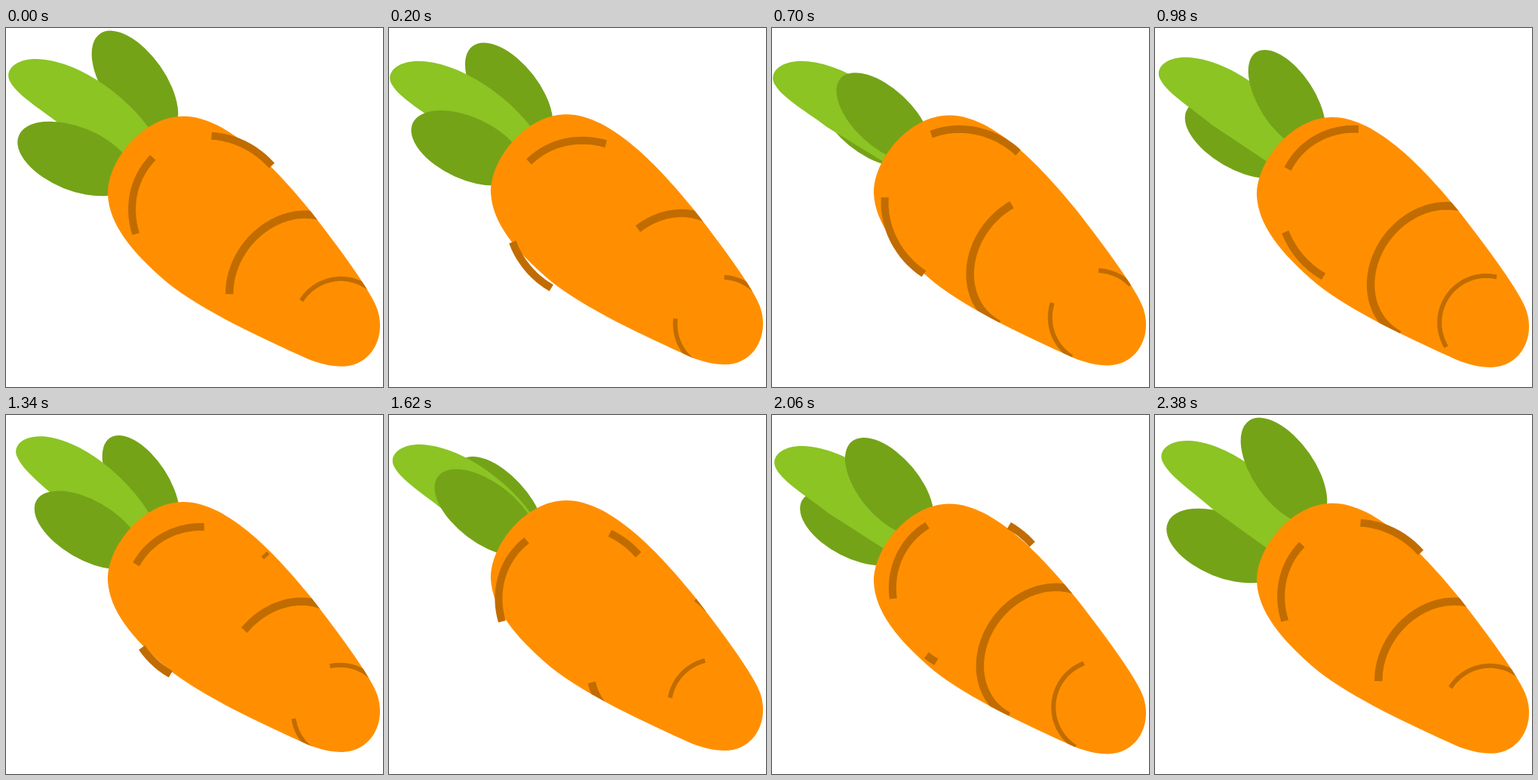
Animation, 500 px wide and 475 px high, one loop 2400 ms. Source, as an HTML page:

```html
<!DOCTYPE html>
<html lang="en">
<head>
<meta charset="utf-8">
<title>Spinning carrot</title>
<style>
  html, body { margin: 0; width: 100%; height: 100%; overflow: hidden; background: #fff; }
  svg { display: block; width: 500px; height: 475px; }
  .dark { fill: #74a318; }
  .mark { fill: none; stroke: #c16c00; stroke-linejoin: round; }
</style>
</head>
<body>
<svg viewBox="0 0 500 475" xmlns="http://www.w3.org/2000/svg">
  <defs>
    <clipPath id="clip"><use id="clipBody" href="#body"/></clipPath>
    <path id="body" d="M135 222C133 180 180 118 235 118C295 118 360 190 405 245C440 290 485 350 493 375C505 415 480 449 446 449C430 449 415 445 400 439C340 412 260 375 215 339C165 297 137 260 135 222Z"/>
  </defs>
  <ellipse id="back" class="dark"/>
  <path id="light" fill="#8bc423" d="M190 133C160 90 95 42 40 41C10 41 -3 58 6 72C16 90 50 110 75 130L150 178L200 190Z"/>
  <ellipse id="front" class="dark"/>
  <use id="flesh" href="#body" fill="#ff8f00"/>
  <g id="crown" class="mark" stroke-width="10"></g>
  <g clip-path="url(#clip)">
    <g id="waist" class="mark" stroke-width="10.5"></g>
    <g id="tip" class="mark" stroke-width="6"></g>
  </g>
</svg>
<script>
const LOOP = 2400, STEP = 20, TURN = 1190;
const $ = id => document.getElementById(id);

// Leaf knots: time, centre x, centre y, angle, half length, half width
const leafA = [
  [0, 92, 173, 22, 81, 42], [420, 119, 142.5, 29, 78, 40],
  [980, 175, 95, 57, 75, 37], [1190, 181, 88, 60, 75, 37],
  [1340, 179, 93, 57, 75, 37], [1620, 147, 115, 47, 75, 36],
  [2060, 109, 149, 27, 78, 40], [2380, 92, 173, 22, 81, 42]
];
const leafB = [
  [0, 171, 74, 55, 81, 41], [420, 146, 102, 48, 78, 40],
  [980, 110, 147, 30, 78, 39], [1190, 105, 155, 28, 78, 39],
  [1340, 108, 152, 30, 78, 39], [1620, 128, 129, 37, 79, 40],
  [2060, 155.7, 95, 50, 78, 40], [2380, 171, 74, 55, 81, 41]
];
// Tilt of the light leaf: time, degrees
const sway = [
  [0, 0], [200, -1.2], [420, 0.7], [700, -1.2], [980, 1], [1130, -0.8],
  [1340, 5.5], [1620, 0.9], [1840, -1.2], [2060, 0], [2200, -1], [2380, 3]
];

// Rings of marks: centre, radii, visible limit, arcs in degrees
const rings = {
  crown: { u: -103, du: 10, v: -2, dv: 1, r: 102, b: 110, max: 100,
           arcs: [[-55, 5], [52, 115], [-184, -118]] },
  waist: { u: 25, du: 22, v: 0, dv: 0.4, r: 95, b: 80, max: 100,
           arcs: [[-45, 173]] },
  tip:   { u: 122, du: 9, v: -5, dv: 0, r: 62, b: 62, max: 97,
           arcs: [[-7, 127], [-159, -93]] }
};

const wave = (t, peak) => Math.cos(2 * Math.PI * (t - peak) / TURN);

// Smooth curve through uneven knots
function spline(knots, t) {
  const last = knots.length - 1;
  let i = 0;
  while (i < last - 1 && t >= knots[i + 1][0]) i++;
  const p = knots[i], q = knots[i + 1];
  const h = q[0] - p[0], s = Math.min(1, (t - p[0]) / h);
  const slope = (k, c) => {
    const a = knots[Math.max(0, k - 1)], b = knots[Math.min(last, k + 1)];
    return (b[c] - a[c]) / (b[0] - a[0]);
  };
  return p.slice(1).map((y0, n) => {
    const c = n + 1, d = q[c] - y0;
    const m0 = slope(i, c) * h, m1 = slope(i + 1, c) * h;
    return y0 + s * (m0 + s * (3 * d - 2 * m0 - m1 + s * (m0 + m1 - 2 * d)));
  });
}

function setLeaf(el, [x, y, angle, a, b]) {
  el.setAttribute("rx", a);
  el.setAttribute("ry", b);
  el.setAttribute("transform", `translate(${x} ${y}) rotate(${angle})`);
}

// Carrot coordinates (u along the axis, v across it) to the stage
const place = (u, v) =>
  (346 + 0.774 * u + 0.634 * v).toFixed(2) + " " + (307 + 0.634 * u - 0.774 * v).toFixed(2);

function arcPath(ring, from, to, t) {
  const cu = ring.u + ring.du * wave(t, 30);
  const cv = ring.v + ring.dv * (-3 + 11 * wave(t, 985));
  const n = Math.max(2, Math.ceil((to - from) / 4));
  const pts = [];
  for (let i = 0; i <= n; i++) {
    const a = (from + (to - from) * i / n) * Math.PI / 180;
    pts.push(place(cu - ring.b * Math.cos(a), cv + ring.r * Math.sin(a)));
  }
  return "M" + pts.join("L");
}

function ringPath(ring, t) {
  const spin = 360 * (t % TURN) / TURN;
  let d = "";
  for (const [start, end] of ring.arcs) {
    for (const turn of [-360, 0, 360]) {
      const from = Math.max(-ring.max, start + spin + turn);
      const to = Math.min(ring.max, end + spin + turn);
      if (to > from) d += arcPath(ring, from, to, t);
    }
  }
  return d;
}

const paths = {};
for (const id in rings) {
  paths[id] = document.createElementNS("http://www.w3.org/2000/svg", "path");
  $(id).append(paths[id]);
}

function draw(time) {
  const t = Math.floor((time % LOOP) / STEP) * STEP;
  const aFront = t < TURN;
  setLeaf($(aFront ? "front" : "back"), spline(leafA, t));
  setLeaf($(aFront ? "back" : "front"), spline(leafB, t));
  $("light").setAttribute("transform", `rotate(${spline(sway, t)[0]} 175 160)`);

  const bob = `translate(0 ${-2.5 + 2.5 * wave(t, 1000)})`;
  $("flesh").setAttribute("transform", bob);
  $("clipBody").setAttribute("transform", bob);
  for (const id in rings) paths[id].setAttribute("d", ringPath(rings[id], t));
}

const begin = performance.now();
function tick() {
  draw(performance.now() - begin);
  requestAnimationFrame(tick);
}
tick();
</script>
</body>
</html>
```
